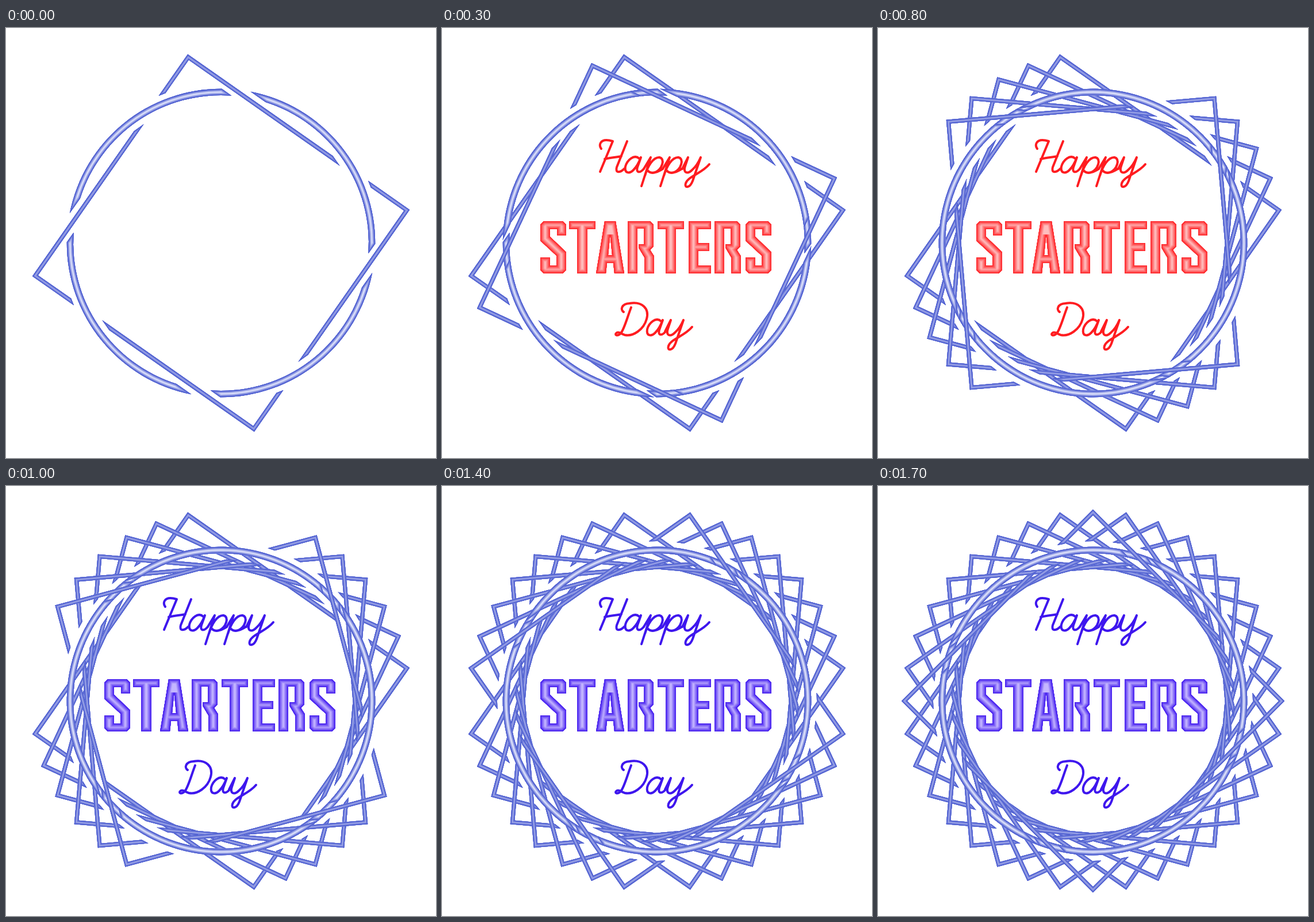
These frames come from a looping animation (748 by 748 pixels, 1800 ms). An HTML page with a canvas:

```html
<!DOCTYPE html>
<html lang="en">
<head>
<meta charset="utf-8">
<title>Happy Starters Day</title>
<style>
  html, body { margin: 0; width: 100%; height: 100%; overflow: hidden; background: #fff; }
  canvas { display: block; }
</style>
</head>
<body>
<canvas id="stage" width="748" height="748" role="img" aria-label="Happy STARTERS Day"></canvas>
<script>
const ctx = document.getElementById('stage').getContext('2d');
const STEP = 100, STEPS = 18, CENTER = 374;

// Frame geometry: square half-sides, ring radii and the clearance at each crossing
const OUT = 235.6, IN = 228.6;
const RING_OUT = 268.2, RING_IN = 257;
const NEAR = 246.5, FAR = 278;
const CUT_OUT = 245.2, CUT_IN = 220.5;

const FRAME = { edge: [62, 80, 204], core: [240, 242, 255], depth: 5.6, power: 1.05 };
const BLUE = { edge: [62, 22, 238], core: [196, 182, 255], depth: 8, power: 0.9 };
const RED = { edge: [255, 28, 32], core: [255, 190, 190], depth: 8, power: 0.9 };

const leg = (r, side) => Math.sqrt(r * r - side * side);

function cornerPiece() {
  const path = new Path2D();
  path.moveTo(leg(FAR, OUT), -OUT);
  path.lineTo(OUT, -OUT);
  path.lineTo(OUT, leg(NEAR, OUT));
  path.lineTo(IN, leg(NEAR, IN));
  path.lineTo(IN, -IN);
  path.lineTo(leg(FAR, IN), -IN);
  path.closePath();
  return path;
}

function ringPiece() {
  const path = new Path2D();
  const start = r => Math.atan2(-CUT_OUT, -leg(r, CUT_OUT));
  const end = r => Math.atan2(-leg(r, CUT_IN), CUT_IN);
  path.arc(0, 0, RING_OUT, start(RING_OUT), end(RING_OUT));
  path.arc(0, 0, RING_IN, end(RING_IN), start(RING_IN), true);
  path.closePath();
  return path;
}

const pieces = [cornerPiece(), ringPiece()];

const glyphs = {
  S: 'M6 0H39L45 6V25H29V14H17V27L45 54V85L39 91H6L0 85V63H17V77H28V60L0 34V6Z',
  T: 'M0 0H46V14H32V91H14V14H0Z',
  A: 'M15 0H34L49 91H32L30 73H19L17 91H0ZM21 59H28L24.5 24Z',
  R: 'M0 0H39L45 6V44L39 50L46 61V91H29V63L19 46V40H28V13H17V91H0Z',
  E: 'M0 0H39V14H17V38H36V52H17V77H39V91H0Z'
};
const word = [['S', 171], ['T', 221], ['A', 268], ['R', 323], ['T', 375], ['E', 429], ['R', 474], ['S', 528]];

// Monoline script letters
const scriptA = new Path2D('M343 227C334 219 322 230 319 241C317 253 326 254 333 247C338 242 343 233 346 225L340 242C337 252 344 253 351 245');
const scriptP = new Path2D('M351 245L363 225L347 275M353 257C358 240 367 225 378 225C389 227 383 246 371 251C365 253 360 251 357 247M371 251C376 250 381 247 384 245');
const scriptY = new Path2D('M418 245L428 225L423 240C419 252 427 255 435 247C442 241 447 232 450 225L436 266C431 279 421 279 424 270C428 258 452 253 465 237');
const scriptH = new Path2D('M277 210C272 203 276 195 286 195C291 195 294 196 297 197L275 250M283 228C292 226 301 225 312 223M322 197L304 242C301 252 309 253 318 244');
const scriptD = new Path2D('M316 494C310 490 312 480 326 479C348 475 361 488 356 506C351 525 332 537 318 534C311 532 309 528 304 530C299 534 305 537 311 531C317 524 322 504 329 486');
const script = [
  [scriptH, 0, 0], [scriptA, 0, 0], [scriptP, 0, 0], [scriptP, 33, 0], [scriptY, 0, 0],
  [scriptD, 0, 0], [scriptA, 38, 283], [scriptY, -30, 283]
];

function at(x, y, draw) {
  ctx.save();
  ctx.translate(x, y);
  draw();
  ctx.restore();
}

// Shades a shape by its distance from the outline
function bevel(path, { edge, core, depth, power }) {
  const shade = d => `rgb(${edge.map((c, i) => Math.round(c + (core[i] - c) * (d / depth) ** power))})`;
  ctx.save();
  ctx.clip(path, 'evenodd');
  ctx.fillStyle = shade(depth);
  ctx.fill(path, 'evenodd');
  for (let d = depth; d > 0.6; d -= 0.5) {
    ctx.lineWidth = 2 * d;
    ctx.strokeStyle = shade(d - 0.5);
    ctx.stroke(path);
  }
  ctx.restore();
}

function drawFrame(angle) {
  at(CENTER, CENTER, () => {
    ctx.rotate(angle * Math.PI / 180);
    for (let side = 0; side < 4; side++) {
      pieces.forEach(piece => bevel(piece, FRAME));
      ctx.rotate(Math.PI / 2);
    }
  });
}

function drawText(ink) {
  for (const [letter, x] of word) at(x, 336, () => bevel(new Path2D(glyphs[letter]), ink));
  ctx.strokeStyle = `rgb(${ink.edge})`;
  ctx.lineWidth = 4;
  ctx.lineCap = ctx.lineJoin = 'round';
  for (const [path, x, y] of script) at(x, y, () => ctx.stroke(path));
  ctx.lineCap = 'butt';
  ctx.lineJoin = 'miter';
}

function draw(step) {
  ctx.fillStyle = '#fff';
  ctx.fillRect(0, 0, 748, 748);
  for (let i = 0; i <= step >> 1; i++) drawFrame(35 - 10 * i);
  const flips = (step + 1) >> 1;
  if (flips) drawText(flips % 2 ? BLUE : RED);
}

let shown = -1;
function tick() {
  const step = Math.floor(performance.now() / STEP) % STEPS;
  if (step !== shown) draw(shown = step);
  requestAnimationFrame(tick);
}
tick();
</script>
</body>
</html>
```
